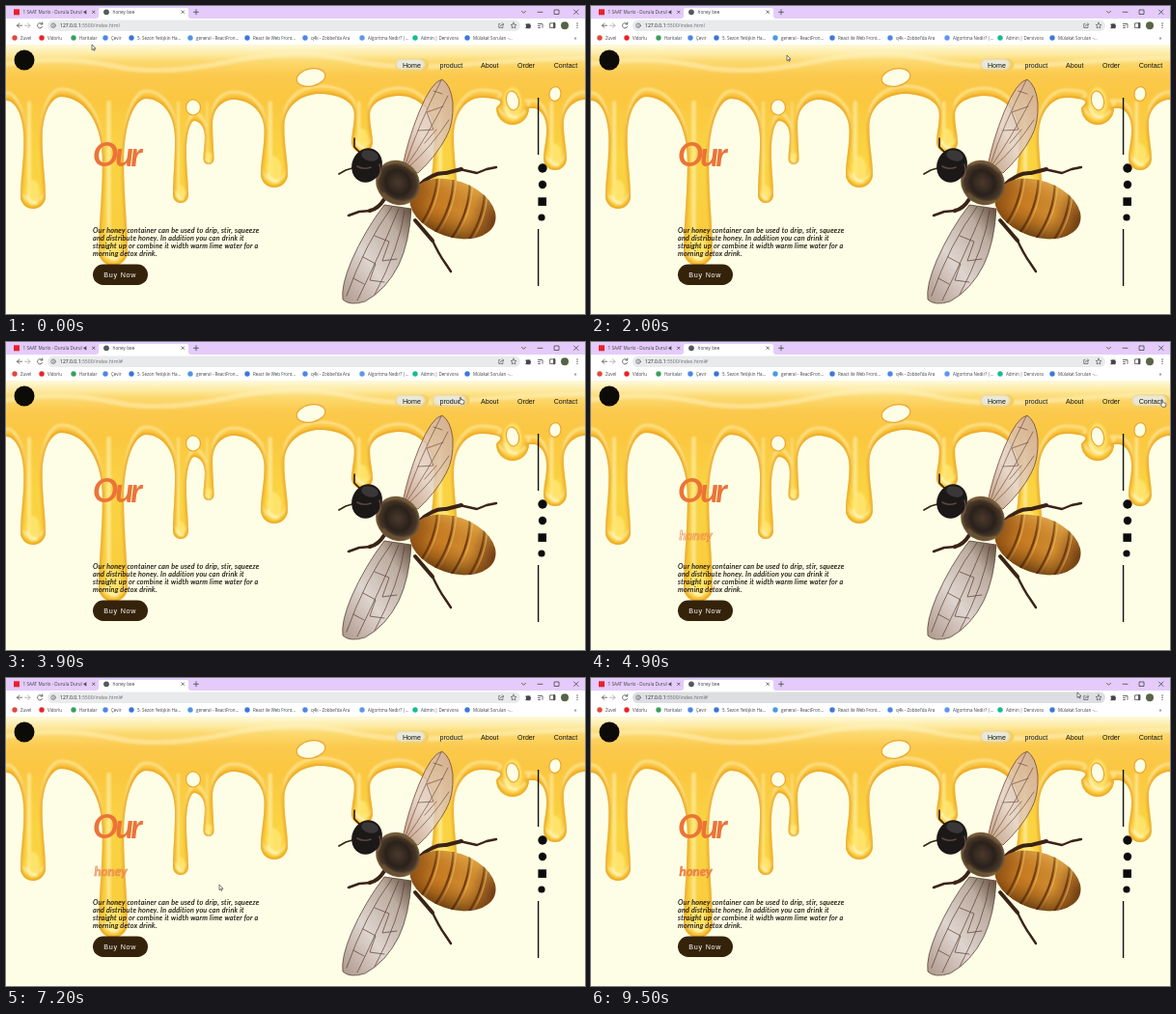
Animation, 600 px wide and 319 px high, one loop 9.6 s. Source, as an HTML page:

```html
<!DOCTYPE html>
<html lang="en">
<head>
<meta charset="utf-8">
<title>honey bee</title>
<style>
html, body { margin: 0; width: 100%; height: 100%; overflow: hidden; background: #fefee6; }
svg { display: block; width: 100vw; height: 100vh; }
text { white-space: pre; }
.ui { font-family: "Open Sans", "Noto Sans", sans-serif; fill: #3c4043; }
.nav { font: 7.1px "Liberation Sans", Arial, sans-serif; fill: #141414; }
.script { font-family: Lato, sans-serif; font-style: italic; font-weight: 700; }
.copy { font: italic 400 7.2px Lato, sans-serif; letter-spacing: .26px; fill: #17120a; stroke: #17120a; stroke-width: .15; }
.line { fill: none; stroke-linecap: round; stroke-linejoin: round; }
</style>
</head>
<body>
<svg viewBox="0 0 600 319" preserveAspectRatio="none">
  <defs>
    <linearGradient id="honey" gradientUnits="userSpaceOnUse" x1="0" y1="40" x2="0" y2="270">
      <stop offset="0" stop-color="#fff5cc"/><stop offset=".035" stop-color="#fdeeae"/>
      <stop offset=".075" stop-color="#fcd970"/><stop offset=".14" stop-color="#fbc94c"/>
      <stop offset=".25" stop-color="#fbc740"/><stop offset=".5" stop-color="#fad442"/>
      <stop offset="1" stop-color="#f8ca3c"/>
    </linearGradient>
    <linearGradient id="belly">
      <stop offset="0" stop-color="#8a4d14"/><stop offset=".3" stop-color="#c67b22"/>
      <stop offset=".7" stop-color="#d08c30"/><stop offset="1" stop-color="#6b3a12"/>
    </linearGradient>
    <linearGradient id="shade" x2="0" y2="1">
      <stop offset="0" stop-color="#ffd878" stop-opacity=".35"/>
      <stop offset=".5" stop-color="#a85d10" stop-opacity="0"/>
      <stop offset="1" stop-color="#3a1c06" stop-opacity=".65"/>
    </linearGradient>
    <radialGradient id="thorax">
      <stop offset="0" stop-color="#4b3a2c"/><stop offset=".55" stop-color="#2a211b"/>
      <stop offset=".85" stop-color="#4a3827"/><stop offset="1" stop-color="#76603f"/>
    </radialGradient>
    <linearGradient id="wingUp" x1="1" y1="0" x2="0" y2="1">
      <stop offset="0" stop-color="#c9a89b"/><stop offset=".6" stop-color="#e3d0c2"/>
      <stop offset="1" stop-color="#b48a70"/>
    </linearGradient>
    <linearGradient id="wingLow" x1="0" y1="1" x2="1" y2="0">
      <stop offset="0" stop-color="#a78f84"/><stop offset=".4" stop-color="#dcd2cc"/>
      <stop offset=".75" stop-color="#b7a69b"/><stop offset="1" stop-color="#4e382a"/>
    </linearGradient>
    <filter id="soft" x="-30%" y="-30%" width="160%" height="160%"><feGaussianBlur stdDeviation="1.3"/></filter>
    <clipPath id="inHoney"><path id="honeyClip"/></clipPath>
    <clipPath id="inBelly"><ellipse rx="46" ry="29"/></clipPath>
    <clipPath id="reveal"><rect id="revealBox" height="30"/></clipPath>
  </defs>

  <rect width="600" height="319" fill="#fefee6"/>
  <g id="drips"></g>

  <g id="bee">
    <g class="line" stroke="#3a2317" stroke-width="4">
      <path d="M428 186Q442 172 456 173L472 169M424 222Q436 236 442 243M392 200Q386 210 377 212"/>
      <path stroke-width="2.4" d="M470 169L488 173 498 169 508 167M441 241Q449 258 455 266L461 275M378 212L366 213 355 217"/>
      <path stroke-width="1.7" d="M367 152L361 146 361 137M362 167L352 170 345 174"/>
    </g>
    <path fill="url(#wingUp)" fill-opacity=".83" stroke="#70483a" stroke-width=".8"
      d="M411 166Q416 140 428 110Q441 78 452 76Q461 82 463 100Q464 122 456 136Q446 155 427 173Z"/>
    <path class="line" stroke="#6d4232" stroke-width=".8" opacity=".8"
      d="M414 164Q426 126 451 77M416 164Q436 136 458 93M418 166Q439 148 459 118M427 129L443 128 436 110 453 104M434 142L446 128M443 88L452 91"/>
    <g transform="translate(463 210) rotate(19)">
      <ellipse rx="46" ry="29" fill="url(#belly)"/>
      <g clip-path="url(#inBelly)">
        <path class="line" stroke="#6b3b10" stroke-width="2.2" d="M-27-29Q-18 0-27 29M-10-31Q0 0-10 31M8-31Q18 0 8 31M25-29Q34 0 25 29"/>
        <path class="line" stroke="#efbc63" stroke-width="1.2" opacity=".7" d="M-24-29Q-15 0-24 29M-7-31Q3 0-7 31M11-31Q21 0 11 31M28-29Q37 0 28 29"/>
        <rect x="-46" y="-29" width="92" height="58" fill="url(#shade)"/>
      </g>
    </g>
    <path fill="url(#wingLow)" fill-opacity=".93" stroke="#59443a" stroke-width=".8"
      d="M392 206Q372 232 358 264Q347 290 349 304Q356 311 372 306Q394 294 407 268Q418 245 420 210Z"/>
    <path class="line" stroke="#58392b" stroke-width=".8" opacity=".85"
      d="M400 208Q372 246 353 300M407 210Q388 256 364 305M413 212Q408 250 382 299M382 238L397 244 390 264 405 262M370 260L383 267 377 284 392 286M360 282L371 288"/>
    <ellipse cx="406" cy="183" rx="24" ry="22" fill="url(#thorax)" transform="rotate(50 406 183)"/>
    <path class="line" stroke="#a58152" stroke-width="2" opacity=".55" filter="url(#soft)" d="M394 164Q409 158 422 171M391 194Q402 206 419 202"/>
    <ellipse cx="374" cy="165" rx="15.500" ry="18" fill="#1c1817" transform="rotate(22 374 165)"/>
    <ellipse cx="377" cy="155" rx="9" ry="5.500" fill="#3b3638" transform="rotate(15 377 155)"/>
    <path class="line" stroke="#7b6858" stroke-width="1.6" opacity=".6" d="M364 166Q370 170 378 167M387 164Q390 173 385 180"/>
  </g>

  <circle cx="19" cy="56" r="10.5" fill="#0d0b08"/>
  <g id="nav"></g>

  <text class="script" x="90" y="166" font-size="35" letter-spacing="-3" fill="#ec7436">Our</text>
  <g clip-path="url(#reveal)">
    <text id="word" class="script" x="91.5" y="205" font-size="13.2" stroke="#e97f52" stroke-width=".6" fill="#f08432">honey</text>
  </g>
  <g id="copy"></g>

  <g id="buy">
    <rect x="90" y="267.5" width="57" height="21.5" rx="10.7" fill="#35220b"/>
    <g id="lit"></g>
    <text id="label" x="101.3" y="280.8" font-family="Liberation Sans, Arial, sans-serif" font-size="7.2" letter-spacing=".75">Buy Now</text>
  </g>

  <path d="M551.6 95V154M551.6 231V290" stroke="#111" stroke-width="1.4"/>
  <g fill="#0b0b0b">
    <circle cx="556" cy="168" r="4.7"/><circle cx="556" cy="185" r="4.2"/>
    <rect x="551.4" y="198.3" width="8.6" height="8.6"/><circle cx="555" cy="219" r="3.6"/>
  </g>

  <g id="browser">
    <rect width="600" height="40" fill="#fff"/>
    <rect width="600" height="13" fill="#e4cbfb"/>
    <path d="M93 13Q96 13 96 10V4Q96 2 98 2H187Q189 2 189 4V10Q189 13 192 13Z" fill="#fff"/>
    <rect x="8" y="3.3" width="6" height="6" fill="#e8212c"/>
    <circle cx="104" cy="6.3" r="2.9" fill="#55595e"/>
    <rect id="bar" x="43" y="14.5" width="490" height="11.6" rx="5.8"/>
    <g class="line" stroke="#45484c" stroke-width=".8">
      <path d="M89.5 5L92 7.5M92 5L89.5 7.5M182 5L184.5 7.5M184.5 5L182 7.5M194.5 6.3H199.5M197 3.8V8.8"/>
      <path d="M534.5 5.3L536.5 7.3 538.5 5.3M551 6.3H556M568.5 4H573V8.5H568.5ZM588.5 4L593 8.5M593 4L588.5 8.5"/>
      <path d="M16.500 20.200H11.500M13.800 17.900L11.500 20.200 13.800 22.500"/>
      <path stroke="#a5a7aa" d="M19.5 20.2H25M22.5 17.7L25 20.2 22.5 22.7"/>
      <path d="M37.5 18.7A2.7 2.7 0 1 0 37.7 21.5M37.8 16.9V18.9H35.8"/>
      <circle cx="49" cy="20.2" r="2.3" stroke-width=".6"/><path stroke-width=".6" d="M49 20V21.3M49 19V19.1"/>
      <path stroke-width=".6" d="M512 18.5H510.7V22.5H515V21M512 21Q512.5 19 515.5 19M514.3 17.6L515.7 19 514.3 20.4"/>
      <path stroke-width=".6" d="M526 17.2L526.9 19.3 529 19.5 527.4 20.9 527.9 23 526 21.9 524.1 23 524.6 20.9 523 19.5 525.1 19.3Z"/>
      <path d="M551.5 18.5H555.5M551.5 20.5H553.5M551.5 22.5H553.5M556 19V22.3"/>
      <rect x="564" y="17.8" width="5" height="4.8"/><path stroke-width="1.8" d="M568 18V22.3"/>
    </g>
    <path fill="#45484c" d="M538.5 18.5H540.2A1 1 0 0 1 542 18.5H543.5V20A1 1 0 0 1 543.5 21.8V23.3H538.5V21.8A1 1 0 0 0 538.5 20ZM80.5 5.5H81.7L83.3 4V8.7L81.7 7.2H80.5Z"/>
    <circle cx="579" cy="20.3" r="4" fill="#566447"/>
    <g fill="#45484c"><circle cx="592" cy="18" r=".7"/><circle cx="592" cy="20.3" r=".7"/><circle cx="592" cy="22.6" r=".7"/></g>
    <text class="ui" x="17.5" y="8.2" font-size="4.7">1 SAAT Murlo - Durula Durul</text>
    <text class="ui" x="110.5" y="8.2" font-size="4.7">honey bee</text>
    <text class="ui" x="56" y="22.2" font-size="5.1"><tspan fill="#202124">127.0.0.1</tspan><tspan id="path" fill="#6a6e73"></tspan></text>
    <g id="marks"></g>
    <text class="ui" x="588.5" y="35" font-size="6">»</text>
  </g>

  <g id="cursor">
    <path id="arrow" d="M0 0V5.6L1.3 4.4 2.2 6.3 3.1 5.9 2.2 4.1H4Z" fill="#fff" stroke="#222" stroke-width=".6"/>
    <path id="hand" d="M-.6 .5Q0-.4 .6 .5V2.8L3.3 3.4Q4 3.7 3.9 4.6L3.3 7.2H.1L-1.9 4.6Q-2 3.7-.6 4.4Z" fill="#fff" stroke="#222" stroke-width=".6"/>
    <path id="beam" d="M-1.2-2.7H1.2M0-2.7V2.7M-1.2 2.7H1.2" fill="none" stroke="#333" stroke-width=".6"/>
  </g>
</svg>
<script>
const $ = id => document.getElementById(id);
const LOOP = 9600, STEP = 100;
const WRITE = 1980, LEAD = 100; // length and head start of one writing of the word

// centre, half width, bottom, then the arch to its right
const drips = [
  [28, 13, 210, 57, 94], [111, 15, 269, 145, 96], [181, 8, 204, 195, 119],
  [210, 5.5, 164, 236, 97], [278, 14, 188, 325, 91], [369, 11, 152, 408, 93],
  [454, 13.5, 205, 492, 95], [525, 17, 123, 547, 106], [569, 12, 170, 600, 97]
];
const holes = [[194, 105, 7.5, 8, 0], [316, 74, 15, 9, -12], [525, 98, 6.5, 10, -12], [569, 91, 6, 7.5, 10]];

function honeyPath() {
  let d = 'M-8 36V98H0', ax = 0, ay = 97;
  for (const [c, w, bottom, bx, by] of drips) {
    const end = bottom - w, n = w * .74;
    const ly = ay + (end - ay) * .42, ry = by + (end - by) * .42;
    d += `C${(ax + c - w) / 2} ${ay} ${c - n} ${ay + (ly - ay) * .3} ${c - n} ${ly}`
      + `C${c - n} ${ly + (end - ly) * .4} ${c - w} ${end - (end - ly) * .3} ${c - w} ${end}`
      + `A${w} ${w} 0 0 0 ${c + w} ${end}`
      + `C${c + w} ${end - (end - ry) * .3} ${c + n} ${ry + (end - ry) * .4} ${c + n} ${ry}`
      + `C${c + n} ${by + (ry - by) * .3} ${(bx + c + w) / 2} ${by} ${bx} ${by}`;
    ax = bx; ay = by;
  }
  return d + 'H608V36Z';
}

function drawHoney() {
  const d = honeyPath();
  $('honeyClip').setAttribute('d', d);
  let shine = '';
  for (const [c, w, bottom] of drips) {
    shine += `<path class="line" d="M${c - w * .3} 100V${bottom - w}" stroke="#fff3b8" stroke-width="${w * .3}" opacity=".6"/>`
      + `<ellipse cx="${c}" cy="${bottom - w * 1.3}" rx="${w * .55}" ry="${w}" fill="#ffe774" opacity=".8"/>`
      + `<path class="line" d="M${c - w * .5} ${bottom - w}Q${c - w * .2} ${bottom - w * .4} ${c + w * .3} ${bottom - w * .45}" stroke="#fffbe0" stroke-width="1.6"/>`;
  }
  $('drips').innerHTML = `<path d="${d}" fill="url(#honey)"/>
    <g clip-path="url(#inHoney)">
      <path d="${d}" fill="none" stroke="#fff2b6" stroke-width="3" opacity=".6" transform="translate(0 -8)" filter="url(#soft)"/>
      <path d="${d}" fill="none" stroke="#eaa221" stroke-width="4.5" opacity=".8" filter="url(#soft)"/>
      <rect y="36" width="600" height="8" fill="#fff9da" opacity=".7" filter="url(#soft)"/>
      <path class="line" d="M0 60Q60 51 110 62T230 58T350 55T470 61T600 54" stroke="#fff4c4" stroke-width="5" opacity=".5" filter="url(#soft)"/>
      <g filter="url(#soft)">${shine}</g>
    </g>` + holes.map(([x, y, a, b, r]) =>
      `<ellipse cx="${x}" cy="${y}" rx="${a}" ry="${b}" transform="rotate(${r} ${x} ${y})" fill="#fefee6" stroke="#eaa62b" stroke-width="1.2"/>`).join('');
}

const links = [['Home', 411, 403, 35], ['product', 449.5, 441.5, 39], ['About', 492, 484, 35],
  ['Order', 530, 522, 35], ['Contact', 567.7, 560, 40]];

const marks = [[8, 'Zuvel', '#df4a3d'], [36, 'Vidorlu', '#ee2029'], [69, 'Haritalar', '#36a35a'],
  [102, 'Çevir', '#4c86e8'], [129, '5. Sezon Yetişkin Ha...', '#3d73d8'], [190, 'general - ReactFron...', '#4b9ade'],
  [249, 'React ile Web Front...', '#3c78d8'], [309, "q4k - Zobbel'da Ara", '#4c86e8'],
  [368, 'Algoritma Nedir? |...', '#5e97e8'], [423, 'Admin | Dersivora', '#16bd91'], [477, 'Mülakat Soruları -...', '#3c78d8']];

const copy = ['Our honey container can be used to drip, stir, squeeze', 'and distribute honey. In addition you can drink it',
  'straight up or combine it width warm lime water for a', 'morning detox drink.'];

// pale pill with a golden inner shadow at its lower right
const pill = (x, y, w, h) => `<rect x="${x}" y="${y}" width="${w}" height="${h}" rx="${h / 2}" fill="#f3cd62"/>
  <rect x="${x + .8}" y="${y + .8}" width="${w - 5}" height="${h - 3.6}" rx="${h / 2 - 1.8}" fill="#e9e8da" filter="url(#soft)"/>`;

function build() {
  drawHoney();
  $('nav').innerHTML = links.map(([s, x, px, w]) =>
    `<g>${pill(px, 54.3, w, 14)}</g><text class="nav" x="${x}" y="64">${s}</text>`).join('');
  $('lit').innerHTML = pill(90, 267.5, 57, 21.5);
  $('marks').innerHTML = marks.map(([x, s, c]) =>
    `<circle cx="${x + 1}" cy="33" r="2.7" fill="${c}"/><text class="ui" x="${x + 7}" y="34.8" font-size="4.5">${s}</text>`).join('');
  $('copy').innerHTML = copy.map((s, i) => `<text class="copy" x="90" y="${235 + i * 7.9}">${s}</text>`).join('');
}

// time, x, y
const mouse = [[0, 89, 40], [2000, 203, 51], [3400, 458, 59], [3900, 471, 57], [4900, 592, 60],
  [6000, 127, 279], [6400, 128, 280], [6800, 130, 280], [8000, 481, 25.8], [9500, 504, 14.8], [9600, 504, 14.8]];

function at(keys, t) {
  const i = Math.max(1, keys.findIndex(k => k[0] > t));
  const a = keys[i - 1], b = keys[i], u = (t - a[0]) / (b[0] - a[0]), e = u * u * (3 - 2 * u);
  return a.slice(1).map((v, j) => v + (b[j + 1] - v) * e);
}

const clamp = v => Math.min(1, Math.max(0, v));
const inside = (x, y, l, t, w, h) => x >= l && x <= l + w && y >= t && y <= t + h;
const show = (el, on) => el.setAttribute('visibility', on ? 'visible' : 'hidden');

// the outline grows from the right, fills, then starts afresh
function drawWord(t) {
  const s = (t + LEAD) % WRITE / WRITE;
  const part = clamp((s / .53) ** 1.3), tiny = part < .08;
  const clip = $('revealBox');
  clip.setAttribute('x', 127 - 38 * part);
  clip.setAttribute('y', tiny ? 201 : 188);
  clip.setAttribute('width', tiny ? 2 : 40);
  $('word').setAttribute('fill-opacity', clamp((s - .56) / .26));
}

function draw(ms) {
  const t = Math.floor(ms % LOOP / STEP) * STEP;
  const [x, y] = at(mouse, t);
  let over = false;
  links.forEach(([, , px, w], i) => {
    const hit = inside(x, y, px, 54, w, 14);
    over = over || hit;
    show($('nav').children[i * 2], hit || i === 0);
  });
  const buy = inside(x, y, 90, 267, 57, 22);
  show($('lit'), buy);
  $('label').setAttribute('fill', buy ? '#2b2115' : '#fff');

  const beam = inside(x, y, 56, 14.5, 440, 12);
  $('bar').setAttribute('fill', inside(x, y, 43, 14.5, 490, 12) ? '#dcdee1' : '#e8eaec');
  $('cursor').setAttribute('transform', `translate(${x} ${y})`);
  show($('hand'), over || buy);
  show($('beam'), beam);
  show($('arrow'), !over && !buy && !beam);

  $('path').textContent = ':5500/index.html' + (t >= 3600 ? '#' : '');
  drawWord(t);
}

build();
const start = performance.now();
function tick() {
  draw(performance.now() - start);
  requestAnimationFrame(tick);
}
tick();
</script>
</body>
</html>
```
